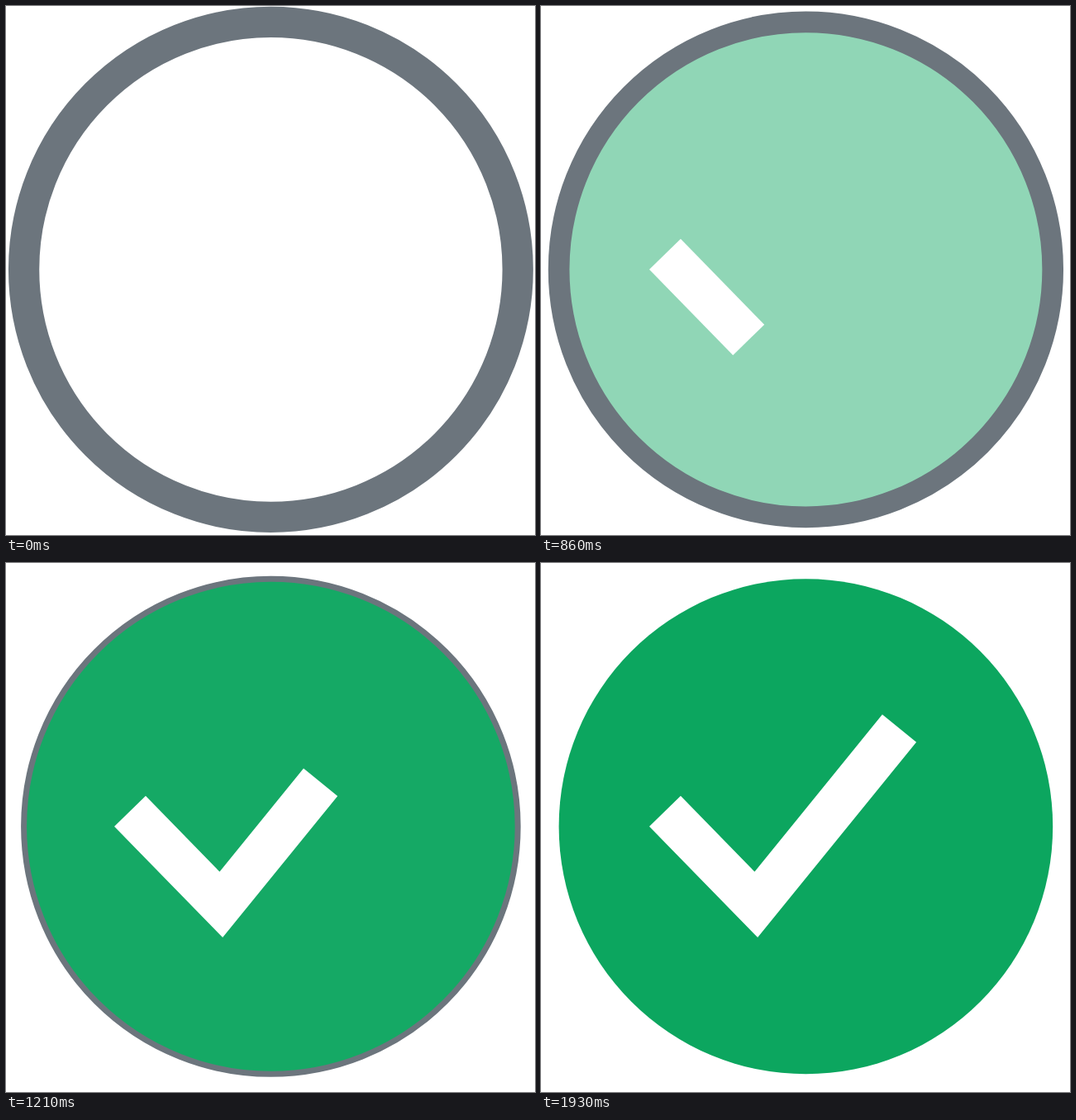
An HTML page for the animation above (6000 ms loop, 640 by 640 pixels).

```html
<!DOCTYPE html>
<html lang="en">
<head>
<meta charset="utf-8">
<title>Check mark</title>
<style>
  html, body { margin: 0; width: 100%; height: 100%; overflow: hidden; background: #fff; }
  svg { display: block; width: 100%; height: 100%; }
</style>
</head>
<body>
<svg viewBox="0 0 640 640">
  <ellipse id="disc" cx="320.4" cy="318.8" rx="298.8" ry="299.5" fill="#0ca65f" stroke="#6c757d"/>
  <path id="check" d="M150 300.3L260.3 413.3L433.5 200" fill="none" stroke="#fff" stroke-width="53"/>
</svg>
<script>
const LOOP = 6000, STEP = 1000 / 14, FIRST = 9, LAST = 27;
const disc = document.getElementById('disc');
const check = document.getElementById('check');
const total = check.getTotalLength();

// Smooth monotone curve through [step, value] points, flat at both ends.
function curve(points) {
  const slope = points.map((p, i) => {
    const a = points[i - 1], b = points[i + 1];
    if (!a || !b) return 0;
    const h0 = p[0] - a[0], h1 = b[0] - p[0];
    const d0 = (p[1] - a[1]) / h0, d1 = (b[1] - p[1]) / h1;
    if (d0 * d1 <= 0) return 0;
    const w0 = 2 * h1 + h0, w1 = h1 + 2 * h0;
    return (w0 + w1) / (w0 / d0 + w1 / d1);
  });
  return x => {
    const i = points.findIndex(p => x < p[0]);
    if (i === 0) return points[0][1];
    if (i < 0) return points[points.length - 1][1];
    const [x0, y0] = points[i - 1], [x1, y1] = points[i];
    const h = x1 - x0, u = (x - x0) / h, v = 1 - u;
    return y0 * v * v * (1 + 2 * u) + y1 * u * u * (3 - 2 * u)
      + h * u * v * (slope[i - 1] * v - slope[i] * u);
  };
}

const ringWidth = curve([[9, 37.3], [11, 33], [13, 17.8], [15, 11.4], [20, 2.8], [27, 0]]);
const fillAlpha = curve([[8, 0], [9, 0.011], [11, 0.26], [13, 0.65], [15, 0.893], [20, 1]]);
const drawn = curve([[9, 48], [11, 92.6], [13, 205], [15, 287], [20, 407], [27, total]]);

// Steps begin on whole hundredths of a second.
function stepAt(t) {
  let k = Math.min(LAST, Math.floor(t / STEP) + 1);
  while (k > 0 && Math.round(k * STEP / 10) * 10 > t) k--;
  return k;
}

function draw(t) {
  const k = stepAt(t);
  disc.setAttribute('stroke-width', ringWidth(k));
  disc.setAttribute('fill-opacity', fillAlpha(k));
  check.setAttribute('visibility', k < FIRST ? 'hidden' : 'visible');
  check.setAttribute('stroke-dasharray', k < LAST ? `${drawn(k)} ${total * 2}` : 'none');
}

let start;
function tick(now) {
  start ??= now;
  draw((now - start) % LOOP);
  requestAnimationFrame(tick);
}
draw(0);
requestAnimationFrame(tick);
</script>
</body>
</html>
```
